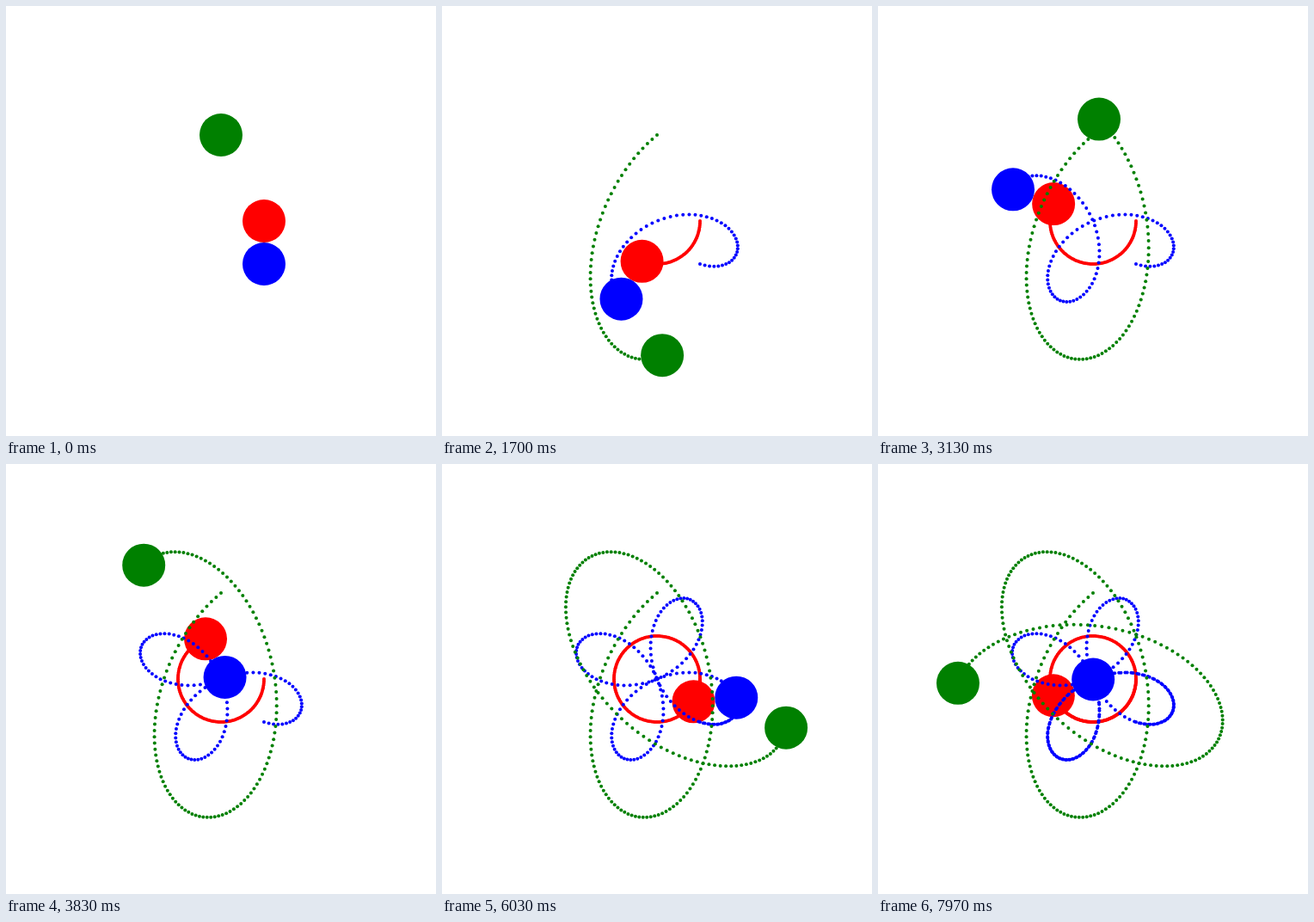
An HTML page with a canvas that plays this animation: 500x500 px, repeating every 8000 ms.

```html
<!DOCTYPE html>
<html lang="en">
<head>
<meta charset="utf-8">
<title>Epicycles</title>
<style>
  html, body { margin: 0; width: 100%; height: 100%; overflow: hidden; background: #fff; }
  canvas { display: block; width: 500px; height: 500px; }
</style>
</head>
<body>
<canvas id="stage" width="500" height="500"></canvas>
<script>
const ctx = document.getElementById('stage').getContext('2d');
const LOOP = 8000;
const STEP = 0.03778;        // radians the red ball turns per step
const BALL = 25, DOT = 2;

const polar = (center, radius, angle) => ({
  x: center.x + radius * Math.cos(angle),
  y: center.y + radius * Math.sin(angle)
});

// Red circles the centre; blue and green circle red the other way round.
const red = a => polar({ x: 250, y: 250 }, 50, a);
const blue = a => polar(red(a), 50, Math.PI / 2 - 3 * a);
const green = a => polar(red(a), Math.hypot(50, 100), Math.atan2(-100, -50) - 1.5 * a);

const bodies = [
  { color: 'red', at: red },
  { color: 'blue', at: blue },
  { color: 'green', at: green }
];

function disc({ x, y }, radius, color) {
  ctx.fillStyle = color;
  ctx.beginPath();
  ctx.arc(x, y, radius, 0, 2 * Math.PI);
  ctx.fill();
}

// 30 steps per second, each starting on a whole 10 ms tick
function stepAt(ms) {
  const tick = Math.floor(ms / 10);
  return Math.ceil(3 * (tick + 1) / 10) - 1;
}

function draw(step) {
  ctx.fillStyle = '#fff';
  ctx.fillRect(0, 0, 500, 500);
  for (const { color, at } of bodies) disc(at(step * STEP), BALL, color);
  for (const { color, at } of bodies) {
    for (let i = 0; i <= step; i++) disc(at(i * STEP), DOT, color);
  }
}

const start = performance.now();
function tick() {
  draw(stepAt((performance.now() - start) % LOOP));
  requestAnimationFrame(tick);
}
tick();
</script>
</body>
</html>
```
